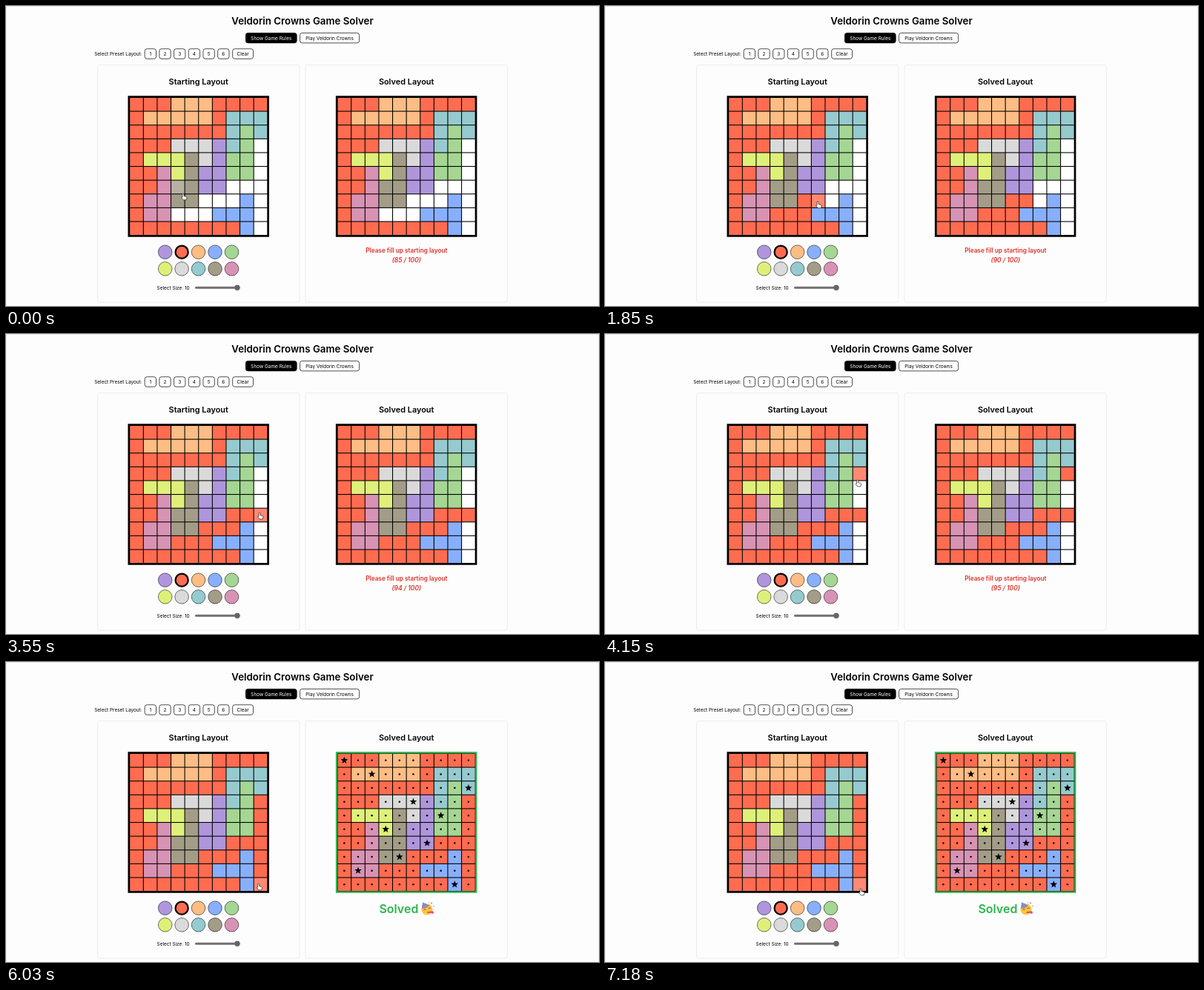
Recreate the animation shown at these times as an HTML page with a canvas. Size 800 by 405 pixels, loop 7210 ms.

```html
<!DOCTYPE html>
<html lang="en">
<head>
<meta charset="utf-8">
<title>Crowns Game Solver</title>
<style>
  html, body { margin: 0; width: 100%; height: 100%; overflow: hidden; background: #fdfdfd; }
  canvas { display: block; width: 800px; height: 405px; }
</style>
</head>
<body>
<canvas id="stage"></canvas>
<script>
const LOOP = 7210, SOLVED_AT = 5550;
const SIZE = 10, PITCH = 18.61, LEFT = 166.7, TOP = 123.5, RIGHT_SHIFT = 280.4;
const BLACK = '#000', GREEN = '#2bb54b', RED = '#df3128';

const COLORS = {
  p: '#af96dc', r: '#ff6c50', o: '#fdbd84', u: '#88affc', g: '#a5d693',
  y: '#dff07a', s: '#dadada', t: '#95cacf', b: '#a39d88', k: '#d893b4', w: '#fff'
};
const LAYOUT = [
  'rrrooorrrr', 'rooooorttt', 'rrrrrrrtgt', 'rrrsssptgw', 'ryyybspggw',
  'rrkybppggw', 'rrkbbppwww', 'rkkbbwwwuw', 'rkkwwwuuuw', 'rrrrrrrruw'
];
const STARS = [0, 2, 9, 5, 7, 3, 6, 4, 1, 8]; // column of the star in each row

// Pointer stops: time, x, y, and 1 when the cell below gets painted
const STOPS = [
  [0, 239, 253], [320, 234, 279, 1], [640, 250, 281, 1], [960, 268, 280, 1],
  [1260, 270, 265, 1], [1600, 285, 264, 1], [1850, 287, 264], [2000, 287, 264],
  [2250, 305, 264, 1], [2560, 306, 244, 1], [2850, 324, 241, 1], [2940, 324.5, 241],
  [3200, 341, 243, 1], [3360, 342, 242], [3520, 342, 242], [3920, 341, 190, 1],
  [4150, 340.5, 197], [4330, 341, 207, 1], [4610, 341, 226, 1], [5000, 339, 263, 1],
  [5090, 338.5, 268], [5270, 340, 281, 1], [SOLVED_AT, 341, 298, 1],
  [5820, 340.5, 299], [6030, 340.5, 299], [7180, 345, 306]
];

const canvas = document.getElementById('stage');
const ctx = canvas.getContext('2d');
const ratio = window.devicePixelRatio || 1;
canvas.width = 800 * ratio;
canvas.height = 405 * ratio;
ctx.scale(ratio, ratio);

const hand = new Path2D('M-1 1Q-1 0 0 0T1 1V3.6L4 4.3Q5.2 4.7 5 5.8L4.3 8.8H.2L-2.4 5.6Q-2 4.4-1 5.2Z');
const cellAt = (x, y) => [Math.floor((x - LEFT) / PITCH), Math.floor((y - TOP) / PITCH)];

function text(str, x, y, size, { weight = 400, color = BLACK, align = 'center', style = '' } = {}) {
  ctx.font = `${style} ${weight} ${size}px Inter, sans-serif`;
  ctx.textAlign = align;
  ctx.fillStyle = color;
  ctx.fillText(str, x, y + size * 0.364);
}

function box(x, y, w, h, radius, fill, stroke) {
  ctx.beginPath();
  ctx.roundRect(x, y, w, h, radius);
  ctx.fillStyle = fill;
  ctx.fill();
  if (stroke) {
    ctx.lineWidth = 0.7;
    ctx.strokeStyle = stroke;
    ctx.stroke();
  }
}

function disc(x, y, r, fill, line = 0) {
  ctx.beginPath();
  ctx.arc(x, y, r, 0, Math.PI * 2);
  ctx.fillStyle = fill;
  ctx.fill();
  if (line) {
    ctx.lineWidth = line;
    ctx.strokeStyle = BLACK;
    ctx.stroke();
  }
}

function shape(d, fill, stroke, width = 0.8) {
  const path = new Path2D(d);
  if (fill) { ctx.fillStyle = fill; ctx.fill(path); }
  if (stroke) { ctx.strokeStyle = stroke; ctx.lineWidth = width; ctx.stroke(path); }
}

function star(x, y, r) {
  ctx.beginPath();
  for (let i = 0; i < 10; i++) {
    const a = i * Math.PI / 5 - Math.PI / 2, d = i % 2 ? r * 0.42 : r;
    ctx.lineTo(x + d * Math.cos(a), y + d * Math.sin(a));
  }
  ctx.fillStyle = BLACK;
  ctx.fill();
}

function button(label, x, y, w, dark) {
  box(x, y, w, 13.5, 3, dark ? BLACK : '#fff', BLACK);
  text(label, x + w / 2, y + 6.8, 6.45, { color: dark ? '#fff' : BLACK });
}

function board(cells, left, frame, hover) {
  const side = SIZE * PITCH;
  box(left - 2.2, TOP - 2.2, side + 4.4, side + 4.4, 0, frame);
  box(left, TOP, side, side, 0, BLACK);
  cells.forEach((row, r) => row.forEach((key, c) => {
    const cell = [left + c * PITCH + 0.54, TOP + r * PITCH + 0.54, PITCH - 1.08, PITCH - 1.08];
    ctx.fillStyle = COLORS[key];
    ctx.fillRect(...cell);
    if (hover && hover[0] === c && hover[1] === r) {
      ctx.fillStyle = 'rgba(255,255,255,.2)';
      ctx.fillRect(...cell);
    }
  }));
}

function marks(left) {
  STARS.forEach((column, r) => {
    for (let c = 0; c < SIZE; c++) {
      const x = left + (c + 0.5) * PITCH, y = TOP + (r + 0.5) * PITCH;
      if (c === column) star(x, y, 5.1);
      else disc(x, y, 1.25, BLACK);
    }
  });
}

function partyFace() {
  disc(568, 334, 7.6, '#fbc63f');
  shape('M561 332L562 324.2L570.5 328.2Q567 332.5 561 332Z', '#5aa9dc');
  shape('M561.4 329.5L566.5 326.4M561 332Q567 332.5 570.5 328.2', null, '#e2589a', 1.2);
  shape('M563.4 334.6Q565 332.6 566.6 334.4M569.6 333Q571 331 572.8 332.6', null, '#593a1c');
  shape('M568.4 337.2L575.5 336.2Q578 337.4 576.4 339.4Q574.6 340.4 574 338.8L568.6 339Z', '#d94c7c');
  disc(574, 325.5, 0.9, '#e2589a');
  disc(577, 329.5, 0.8, '#55b86b');
  disc(570.5, 324.8, 0.7, '#f0a52e');
}

function page() {
  ctx.fillStyle = '#fdfdfd';
  ctx.fillRect(0, 0, 800, 405);
  ctx.fillStyle = '#e6e6e6';
  ctx.fillRect(0, 0, 800, 1);
  ctx.fillStyle = '#f0f0f0';
  ctx.fillRect(0, 0, 1, 405);
  ctx.fillRect(799, 0, 1, 405);

  text('Veldorin Crowns Game Solver', 400, 20.3, 13.3, { weight: 600 });
  button('Show Game Rules', 323.4, 36.4, 68.8, true);
  button('Play Veldorin Crowns', 396.6, 36.4, 80);
  text('Select Preset Layout:', 119.2, 64.5, 6.45, { align: 'left' });
  for (let i = 0; i < 6; i++) button(String(i + 1), 187.2 + i * 19.7, 57.8, 15.3);
  button('Clear', 305.7, 57.8, 27.8);

  ['Starting Layout', 'Solved Layout'].forEach((title, i) => {
    box(123.6 + i * RIGHT_SHIFT, 79.6, 272.4, 320.4, 3, '#fdfdfd', '#e3e5e8');
    text(title, 259.7 + i * RIGHT_SHIFT, 102.4, 10.9, { weight: 600 });
  });

  [...'prougystbk'].forEach((key, i) => {
    const selected = key === 'r';
    disc(214.7 + (i % 5) * 22.45, 332.2 + Math.floor(i / 5) * 22.6,
      selected ? 8.6 : 9.3, COLORS[key], selected ? 2.2 : 0.55);
  });
  text('Select Size: 10', 203.6, 380.2, 6.45, { align: 'left' });
  box(255, 378.7, 60.5, 3, 1.5, '#707070');
  disc(312, 380.2, 3.7, '#666');
}

function pointer(t) {
  const next = STOPS.findIndex(stop => stop[0] > t);
  if (next < 0) return STOPS[STOPS.length - 1].slice(1, 3);
  const [t0, x0, y0] = STOPS[next - 1], [t1, x1, y1] = STOPS[next];
  const k = (t - t0) / (t1 - t0), ease = k * k * (3 - 2 * k);
  return [x0 + (x1 - x0) * ease, y0 + (y1 - y0) * ease];
}

function draw(t) {
  const cells = LAYOUT.map(row => [...row]);
  for (const [time, x, y, paint] of STOPS) {
    if (!paint || time > t) continue;
    const [c, r] = cellAt(x, y);
    cells[r][c] = 'r';
  }
  const filled = cells.flat().filter(key => key !== 'w').length;
  const solved = t >= SOLVED_AT;
  const [x, y] = pointer(t);
  const right = LEFT + RIGHT_SHIFT;

  page();
  board(cells, LEFT, BLACK, cellAt(x, y));
  board(cells, right, solved ? GREEN : BLACK);
  if (solved) {
    marks(right);
    text('Solved', 503.4, 333.3, 16, { weight: 600, color: GREEN, align: 'left' });
    partyFace();
  } else {
    text('Please fill up starting layout', 540.3, 329.5, 8.25, { weight: 600, color: RED });
    text(`(${filled} / 100)`, 540.3, 342.6, 8.5, { weight: 600, color: RED, style: 'italic' });
  }

  ctx.save();
  ctx.translate(x, y);
  ctx.fillStyle = '#fff';
  ctx.fill(hand);
  ctx.lineWidth = 0.7;
  ctx.strokeStyle = '#222';
  ctx.stroke(hand);
  ctx.restore();
}

function tick() {
  draw(performance.now() % LOOP);
  requestAnimationFrame(tick);
}
tick();
</script>
</body>
</html>
```
